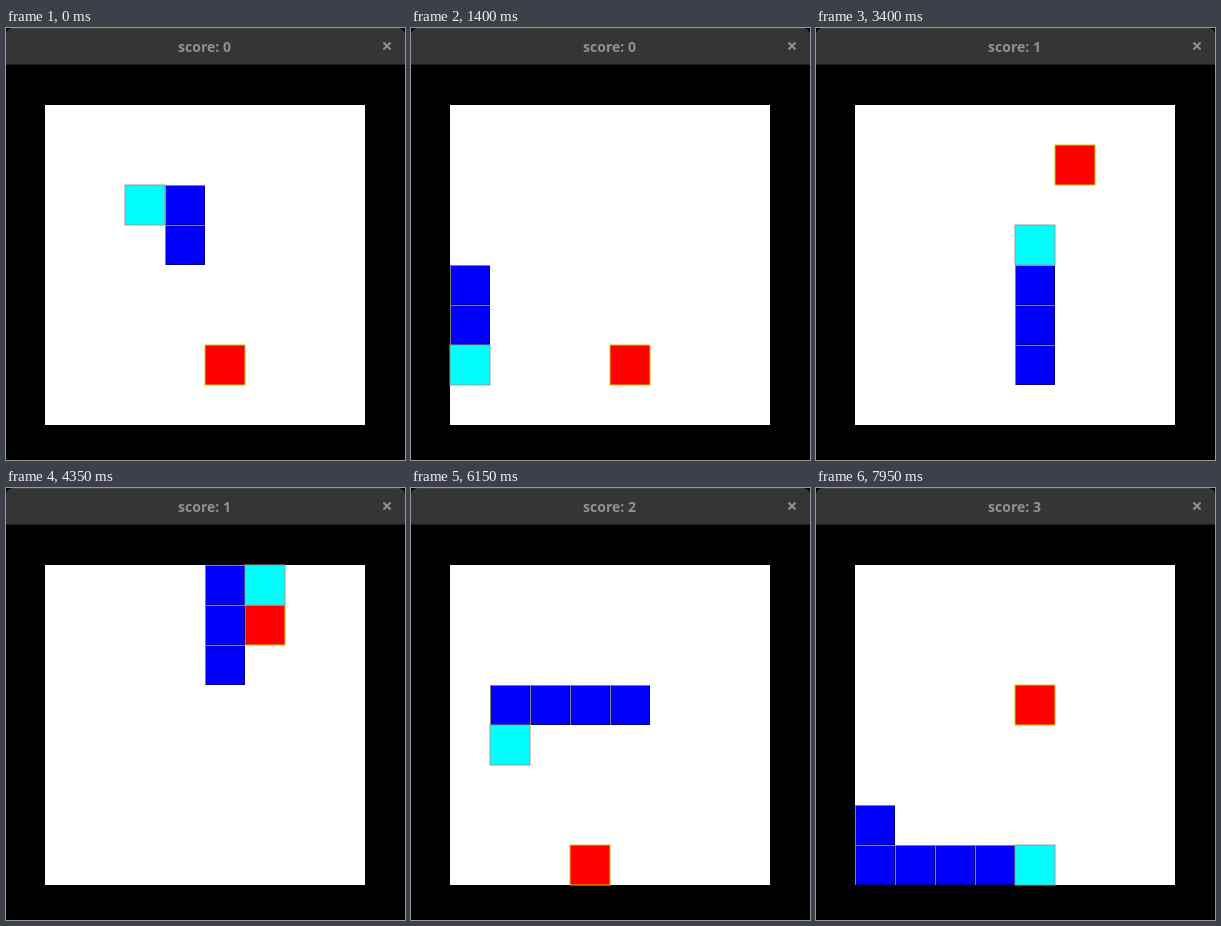
An HTML page with a canvas for the animation above (8 s loop, 399 by 432 pixels).

```html
<!DOCTYPE html>
<html lang="en">
<head>
<meta charset="utf-8">
<title>Snake</title>
<style>
  html, body { margin: 0; width: 100%; height: 100%; overflow: hidden; background: #000; }
  header {
    position: absolute; top: 0; left: 0; width: 399px; height: 37px;
    box-sizing: border-box; border-radius: 7px 7px 0 0;
    background: #353535; border-top: 1px solid #424242; border-bottom: 1px solid #202020;
    color: #919190; font: bold 14px/35px "Noto Sans", sans-serif; text-align: center;
  }
  #score { position: absolute; left: 0; top: 0; width: 397px; }
  header svg { position: absolute; left: 376px; top: 12px; }
  canvas { position: absolute; left: 0; top: 37px; }
</style>
</head>
<body>
<header>
  <span id="score">score: 0</span>
  <svg width="10" height="10" stroke="#919190" stroke-width="2"><path d="M1.5 1.5l7 7m0-7l-7 7"/></svg>
</header>
<canvas id="board" width="399" height="395"></canvas>
<script>
const LOOP = 8000, CELL = 40, LEFT = 39, TOP = 40;
const QUICK = 180, STEADY = 219;

// Each run of moves starts at a set time and keeps an even beat.
const runs = [
  { start: 290, beat: QUICK, moves: 'LLD' },
  { start: 1000, beat: QUICK, moves: 'DDDD' },
  { start: 1845, beat: STEADY, moves: 'RRRRUUUUUUU' },
  { start: 4350, beat: STEADY, moves: 'RDDDLLLLDL' },
  { start: 6595, beat: STEADY, moves: 'DDDRRRR' }
];
const heading = { L: [-1, 0], R: [1, 0], U: [0, -1], D: [0, 1] };
const foods = [[4, 6], [5, 1], [3, 7], [4, 3]];

const ctx = document.getElementById('board').getContext('2d');
const label = document.getElementById('score');
const same = (a, b) => a[0] === b[0] && a[1] === b[1];

function stateAt(t) {
  const snake = [[2, 2], [3, 2], [3, 3]];
  let eaten = 0;
  for (const { start, beat, moves } of runs) {
    for (let i = 0; i < moves.length && start + i * beat <= t; i++) {
      const [dx, dy] = heading[moves[i]];
      const head = [snake[0][0] + dx, snake[0][1] + dy];
      snake.unshift(head);
      if (same(head, foods[eaten])) eaten++;
      else snake.pop();
    }
  }
  return { snake, eaten };
}

const corner = ([col, row]) => [LEFT + col * CELL, TOP + row * CELL];

function box(x, y, w, h, fill) {
  ctx.fillStyle = fill;
  ctx.fillRect(x, y, w, h);
}

function outlinedCell(cell, fill, line) {
  const [x, y] = corner(cell);
  box(x, y, CELL, CELL, fill);
  ctx.strokeStyle = line;
  ctx.strokeRect(x, y, CELL, CELL);
}

function bodyCell(cell) {
  const [x, y] = corner(cell);
  box(x, y, CELL, CELL, '#808080');
  box(x + 1, y + 1, CELL - 1, CELL - 1, '#000080');
  box(x + 1, y + 1, CELL - 2, CELL - 2, '#0000fd');
}

function draw(t) {
  const { snake, eaten } = stateAt(t);
  box(0, 0, 399, 395, '#000');
  box(LEFT, TOP, CELL * 8, CELL * 8, '#fff');
  outlinedCell(foods[eaten], '#fe0000', '#cc0');
  snake.slice(1).forEach(bodyCell);
  outlinedCell(snake[0], '#00fefe', '#999');
  const text = 'score: ' + eaten;
  if (label.textContent !== text) label.textContent = text;
}

const start = performance.now();
function tick() {
  draw((performance.now() - start) % LOOP);
  requestAnimationFrame(tick);
}
tick();
</script>
</body>
</html>
```
